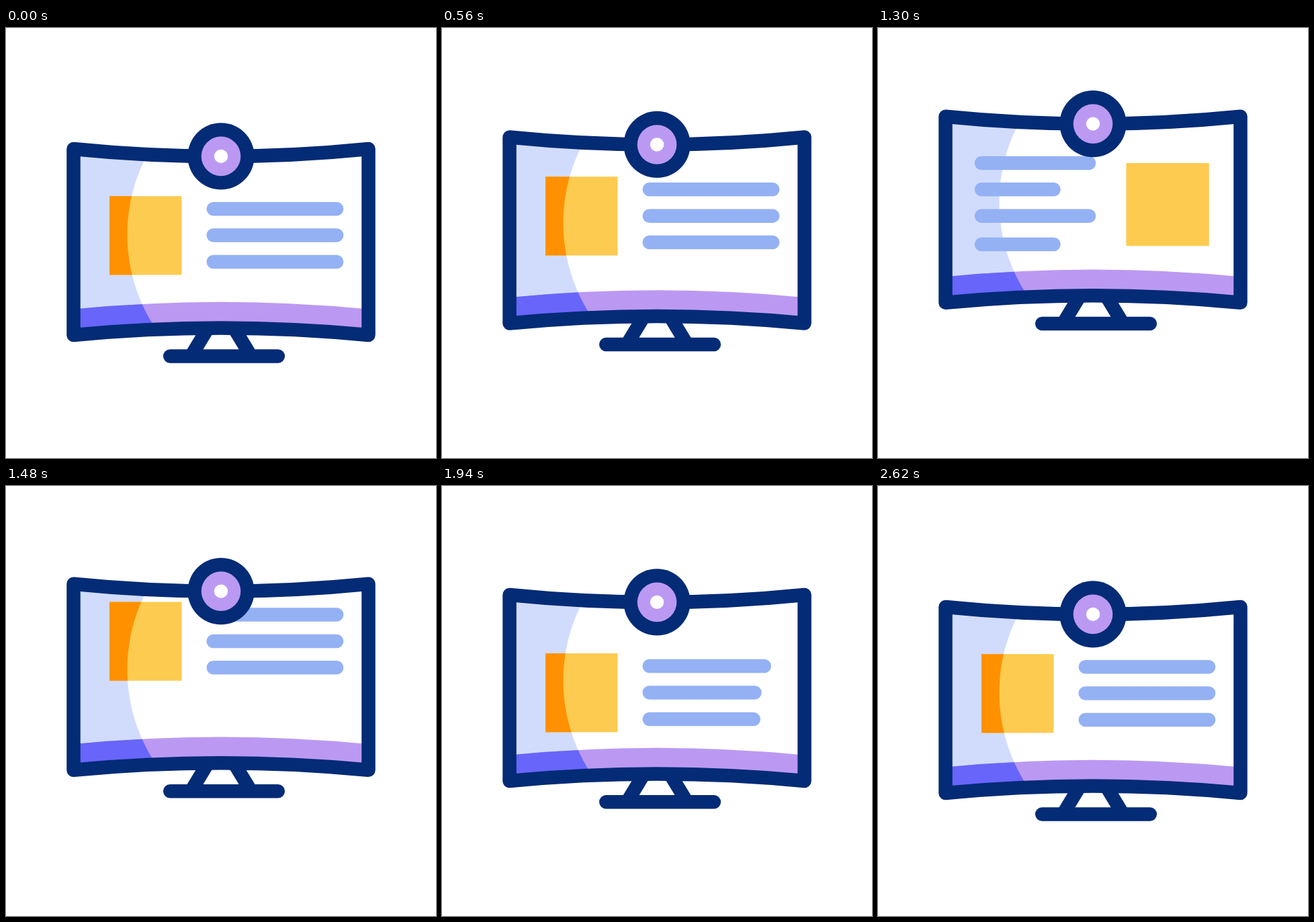
Animation of 640x640 px, one loop 3.16 s. Source, as an HTML page with a canvas:

```html
<!DOCTYPE html>
<html lang="en">
<head>
<meta charset="utf-8">
<title>Monitor</title>
<style>
  html, body { margin: 0; height: 100%; overflow: hidden; background: #fff; }
  canvas { display: block; width: 100vmin; height: 100vmin; }
</style>
</head>
<body>
<canvas id="stage" width="640" height="640"></canvas>
<script>
const ctx = document.getElementById('stage').getContext('2d');
const LOOP = 3160, STROKE = 20.5, PAGE_GAP = 300;
const NAVY = '#042b76', BLUE = '#94b1f4', PALE = '#d1dcfd', LILAC = '#bb99f3',
      VIOLET = '#6865fa', YELLOW = '#fdcb50', ORANGE = '#ff9100', WHITE = '#fff';

// Keys are [time, value, x1, x2]; x1 and x2 shape the easing that leads into the key.
const monitorKeys = [[220, 0], [340, 20, .4, .6], [1300, -48.3, 0, .2],
                     [1730, 19.7, .6, .73], [2000, -21, .4, .5], [2370, 0, .4, .5]];
const scrollKeys = [[220, 0], [340, 14, .4, .6], [840, -PAGE_GAP - 4.5, .9, .5],
                    [1240, -PAGE_GAP, .4, .6], [1300, -PAGE_GAP],
                    [1620, -1.8, .6, .3], [2360, 0, .4, .6]];
const lineKeys = [1892, 1872, 1870].map((start, i) =>
  [[start, 1], [start + 240, 0], [2260 + 60 * i, 0], [2500 + 60 * i, 1]]);

function ease(x, x1, x2) {
  let lo = 0, hi = 1, s;
  for (let i = 0; i < 24; i++) {
    s = (lo + hi) / 2;
    const r = 1 - s;
    if (3 * r * r * s * x1 + 3 * r * s * s * x2 + s ** 3 < x) lo = s; else hi = s;
  }
  return s * s * (3 - 2 * s);
}

function valueAt(keys, t) {
  const next = keys.findIndex(key => key[0] > t);
  if (next < 0) return keys[keys.length - 1][1];
  if (next === 0) return keys[0][1];
  const [t0, v0] = keys[next - 1], [t1, v1, x1 = .5, x2 = .5] = keys[next];
  return v0 + (v1 - v0) * ease((t - t0) / (t1 - t0), x1, x2);
}

function line(x1, y1, x2, y2, color, cap = 'round') {
  ctx.beginPath();
  ctx.moveTo(x1, y1);
  ctx.lineTo(x2, y2);
  ctx.lineCap = cap;
  ctx.strokeStyle = color;
  ctx.stroke();
}

function rect(x, y, w, h, color) {
  ctx.fillStyle = color;
  ctx.fillRect(x, y, w, h);
}

function disc(x, y, r, color) {
  ctx.beginPath();
  ctx.arc(x, y, r, 0, 7);
  ctx.fillStyle = color;
  ctx.fill();
}

// A panel with curved top and bottom edges, spanning the monitor width.
function panel(top, topBend, bottom, bottomBend) {
  const path = new Path2D();
  path.moveTo(100.5, top);
  path.quadraticCurveTo(320, topBend, 539.5, top);
  path.lineTo(539.5, bottom);
  path.quadraticCurveTo(320, bottomBend, 100.5, bottom);
  path.closePath();
  return path;
}

const screen = panel(180, 202, 457, 436);
const band = panel(418.5, 397, 457, 436);
const shade = new Path2D('M434 54A253.5 253.5 0 0 0 434 561H0V54Z');

function clipped(path, dy, draw) {
  ctx.save();
  ctx.translate(0, dy);
  ctx.clip(path);
  ctx.translate(0, -dy);
  draw();
  ctx.restore();
}

function drawPages(t, scroll, dy) {
  const y = 250.2 + scroll;
  rect(154, y, 107.5, 117.3, YELLOW);
  clipped(shade, dy, () => rect(154, y, 107.5, 117.3, ORANGE));
  lineKeys.forEach((keys, i) => {
    const length = valueAt(keys, t), ly = 269.2 + 39.4 * i + scroll;
    if (length > 0) line(308.7, ly, 308.7 + 183.4 * length, ly, BLUE);
  });

  const below = scroll + PAGE_GAP;
  rect(369.4, 201 + below, 123.3, 123.3, YELLOW);
  [201, 240.3, 279.7, 321.9].forEach((ly, i) =>
    line(154, ly + below, i % 2 ? 261.5 : 314, ly + below, BLUE));
}

function draw(t) {
  const dy = valueAt(monitorKeys, t), scroll = valueAt(scrollKeys, t);
  rect(0, 0, 640, 640, WHITE);
  ctx.lineWidth = STROKE;
  ctx.lineJoin = 'round';

  clipped(screen, dy, () => {
    clipped(shade, dy, () => rect(0, 0, 640, 640, PALE));
    drawPages(t, scroll, dy);
    clipped(band, dy, () => {
      rect(0, 0, 640, 640, LILAC);
      clipped(shade, dy, () => rect(0, 0, 640, 640, VIOLET));
    });
  });

  ctx.save();
  ctx.translate(0, dy);
  line(301, 446, 278, 484, NAVY, 'butt');
  line(339, 446, 362, 484, NAVY, 'butt');
  line(244.2, 488.4, 404.8, 488.4, NAVY);
  ctx.stroke(screen);
  disc(320, 190.9, 49.6, NAVY);
  disc(320, 190.9, 29.3, LILAC);
  disc(320, 190.9, 10.2, WHITE);
  ctx.restore();
}

function tick() {
  draw(performance.now() % LOOP);
  requestAnimationFrame(tick);
}
tick();
</script>
</body>
</html>
```
